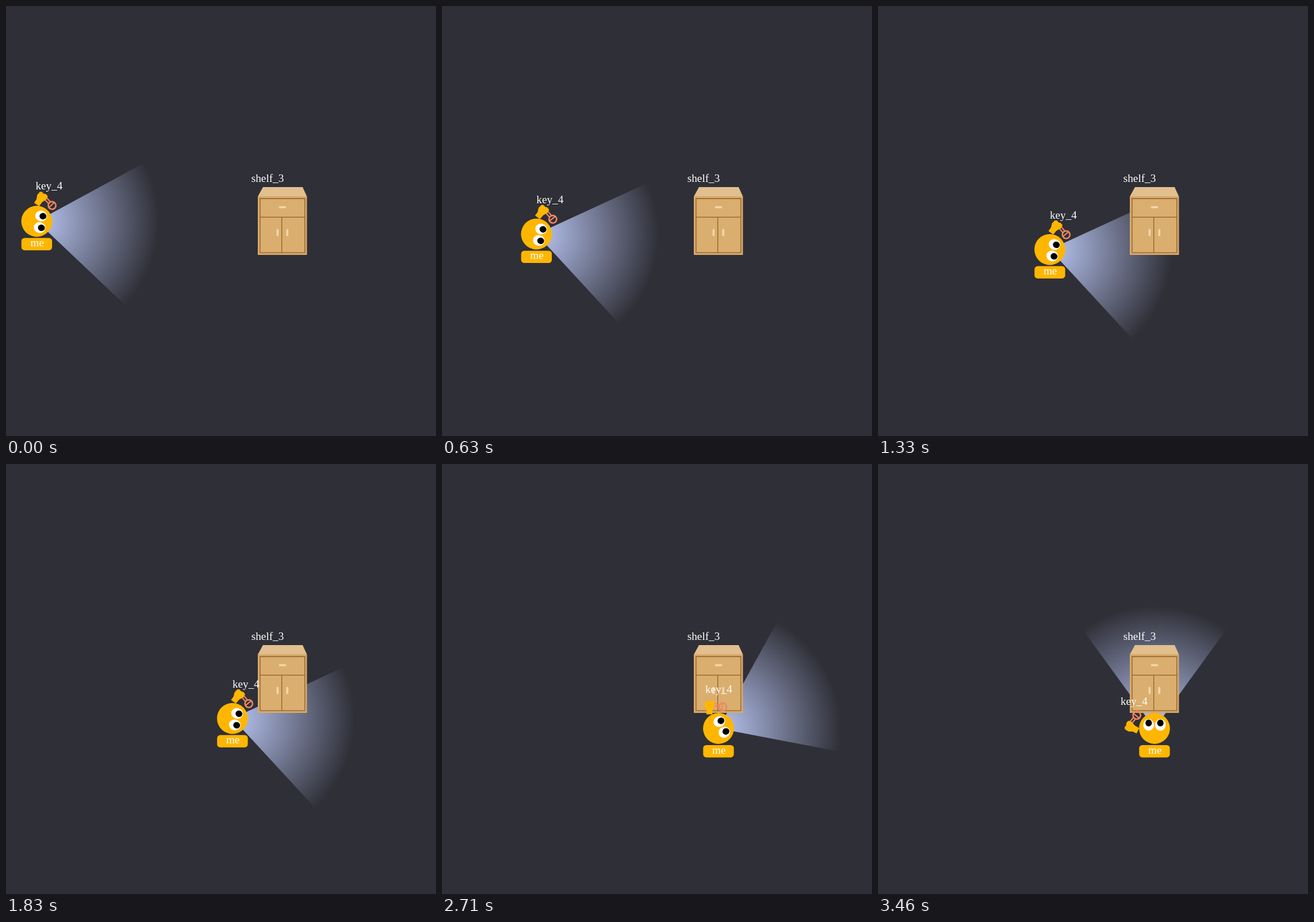
Animation, 748 px wide and 748 px high, one loop 3.75 s. Source, as an HTML page with a canvas:

```html
<!DOCTYPE html>
<html lang="en">
<head>
<meta charset="utf-8">
<title>Bringing the key to the shelf</title>
<style>
  html, body { margin: 0; width: 100%; height: 100%; overflow: hidden; background: #2f2f37; }
  canvas { display: block; }
</style>
</head>
<body>
<canvas id="stage" width="748" height="748"></canvas>
<script>
const ctx = document.getElementById('stage').getContext('2d');
const LOOP = 3750, STEP = 1000 / 24, LAST_STEP = 83;
const WALK_START = 1, WALK_END = 55;
const FROM = { x: 53.5, y: 374.5 }, TO = { x: 481, y: 460 };
const YELLOW = '#ffb600', KEY = '#f0875f', LINE = '#8f5f2c', KNOB = '#f2d6a8';
const rad = deg => deg * Math.PI / 180;

function fill(color, trace) {
  ctx.fillStyle = color;
  ctx.beginPath();
  trace();
  ctx.fill();
}

function stroke(color, width, trace) {
  ctx.strokeStyle = color;
  ctx.lineWidth = width;
  ctx.beginPath();
  trace();
  ctx.stroke();
}

const poly = points => points.forEach(([x, y]) => ctx.lineTo(x, y));
const oval = (x, y, rx, ry = rx) => ctx.ellipse(x, y, rx, ry, 0, 0, 7);

function line(x1, y1, x2, y2) {
  ctx.moveTo(x1, y1);
  ctx.lineTo(x2, y2);
}

function label(text, x, y, align = 'left') {
  ctx.font = '19.2px "Liberation Serif", serif';
  ctx.textAlign = align;
  ctx.fillStyle = '#fff';
  ctx.fillText(text, x, y);
}

// Position and heading in degrees; 0 looks right, -90 looks up.
function poseAt(step) {
  const walk = Math.min(1, Math.max(0, (step - WALK_START) / (WALK_END - WALK_START)));
  const turn = Math.max(0, step - WALK_END);
  return {
    x: FROM.x + (TO.x - FROM.x) * walk,
    y: FROM.y + (TO.y - FROM.y) * walk,
    heading: step < WALK_START ? 7.5 : Math.max(-90, 11.3 - 3.65 * turn)
  };
}

function drawLight({ x, y, heading }) {
  const radius = 213, glow = ctx.createRadialGradient(x, y, 0, x, y, radius);
  glow.addColorStop(0, 'rgba(185,198,243,1)');
  glow.addColorStop(1, 'rgba(185,198,243,0)');
  fill(glow, () => {
    ctx.moveTo(x, y);
    ctx.arc(x, y, radius, rad(heading - 36), rad(heading + 36));
  });
}

function drawShelf() {
  fill('#e1bf8e', () => poly([[447, 315], [516, 315], [523.5, 331.5], [438, 331.5]]));
  fill('#d6a96a', () => ctx.rect(438, 331, 85.5, 102));
  fill('#daae6e', () => ctx.rect(442, 335, 78, 94));
  stroke(LINE, 1.3, () => {
    ctx.rect(442, 335, 77.8, 94.2);
    line(442, 367.3, 519.8, 367.3);
    line(479.7, 367.3, 479.7, 429);
  });
  fill(KNOB, () => {
    ctx.roundRect(474.7, 348.2, 12.4, 3.6, 1);
    ctx.roundRect(470.6, 388, 3.6, 12.2, 1);
    ctx.roundRect(487.5, 388, 3.6, 12.2, 1);
  });
  label('shelf_3', 426.8, 306);
}

function drawKey() {
  ctx.save();
  ctx.translate(-30.8, -22.8);
  ctx.rotate(rad(129));
  stroke(KEY, 2.6, () => oval(0, 0, 6.6));
  stroke(KEY, 2.2, () => {
    line(1.2, -6, 1.2, 6);
    line(6, -2.2, 18, -2.2);
    line(6, 2.2, 18, 2.2);
  });
  ctx.restore();
}

function drawHand() {
  ctx.save();
  ctx.rotate(rad(-65));
  fill(YELLOW, () => poly([
    [-21, -24.5], [-21, -32], [-24, -39], [-23, -46], [-20, -48], [-16, -47],
    [-12, -48.5], [-7, -47], [-6.5, -41], [-10, -33], [-10.5, -24.5]
  ]));
  ctx.restore();
}

function drawPerson({ x, y, heading }) {
  const turn = rad(heading + 90);
  ctx.save();
  ctx.translate(x, y);
  ctx.save();
  ctx.rotate(turn);
  drawKey();
  drawHand();
  fill(YELLOW, () => oval(0, 0, 26.9));
  for (const side of [-10.2, 10.2]) {
    fill('#fff', () => oval(side, -6.3, 9.3, 10.2));
    fill('#000', () => oval(side, -9.5, 5.6, 6));
  }
  ctx.restore();

  fill(YELLOW, () => ctx.roundRect(-26.7, 29, 53.4, 21.4, 5.5));
  label('me', 0.7, 43.5, 'center');

  // The caption follows the key but stays upright.
  const orbit = rad(-153) + turn;
  label('key_4', -24.2 + 39.1 * Math.cos(orbit), -23.3 + 39.1 * Math.sin(orbit));
  ctx.restore();
}

function draw() {
  const time = performance.now() % LOOP;
  const pose = poseAt(Math.min(LAST_STEP, Math.floor((time + 5) / STEP)));
  ctx.fillStyle = '#2f2f37';
  ctx.fillRect(0, 0, 748, 748);
  drawLight(pose);
  drawShelf();
  drawPerson(pose);
  requestAnimationFrame(draw);
}

draw();
</script>
</body>
</html>
```
